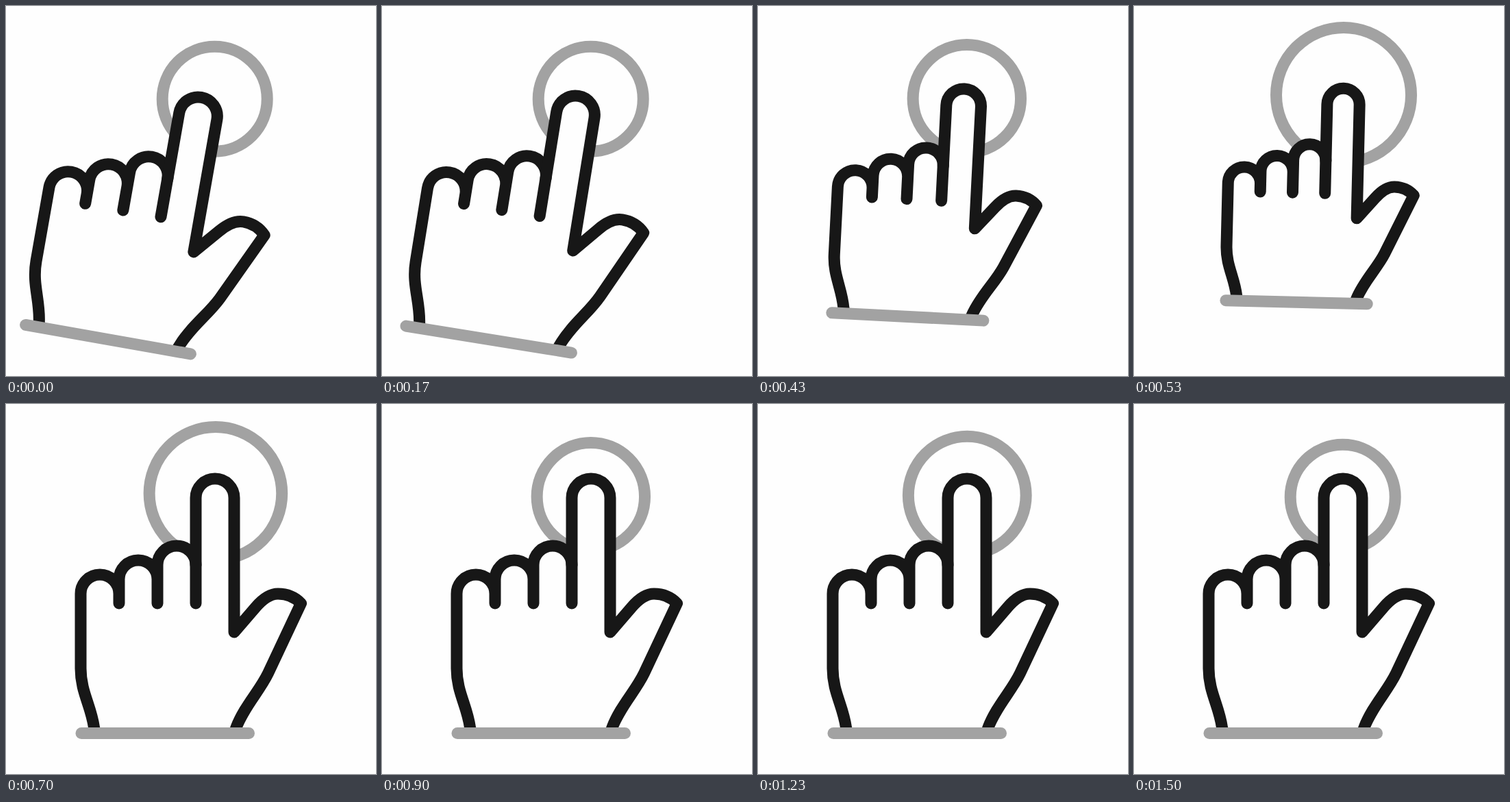
Recreate the animation shown at these times as an HTML page. Size 540x540 px, loop 1.53 s.

```html
<!DOCTYPE html>
<html lang="en">
<head>
<meta charset="utf-8">
<title>Tapping hand</title>
<style>
  html, body { margin: 0; width: 100%; height: 100%; overflow: hidden; background: #fefefe; }
  svg { display: block; width: 100%; height: 100%; }
  path, circle {
    fill: none; stroke-width: 17; stroke-linecap: round; stroke-linejoin: round;
    vector-effect: non-scaling-stroke;
  }
  .ink { stroke: #171717; }
  .soft { stroke: #a2a2a2; }
  .palm { fill: #fefefe; }
</style>
</head>
<body>
<svg viewBox="0 0 540 540">
  <circle id="ring" class="soft"/>
  <g id="hand">
    <path class="palm" d="M130 479 L128.5 472 C124 440 109 420 109 386 V277 A28 28 0 0 1 165 277 V256 A28 28 0 0 1 221 256 V235 A28 28 0 0 1 277 235 V137 A28 28 0 0 1 333 137 V333 L364 297 C375 284 385 277 397 277 C410 277 421 281 430.5 291 L382.5 393 C370 419 348 441 336 472 L333.5 479 Z"/>
    <path class="ink" d="M130 479 L128.5 472 C124 440 109 420 109 386 V277 A28 28 0 0 1 165 277 V291 V256 A28 28 0 0 1 221 256 V291 V235 A28 28 0 0 1 277 235"/>
    <path class="ink" d="M277 291 V137 A28 28 0 0 1 333 137 V333 L364 297 C375 284 385 277 397 277 C410 277 421 281 430.5 291 L382.5 393 C370 419 348 441 336 472 L333.5 479"/>
    <path class="soft" d="M110 480.5 H354.5"/>
  </g>
</svg>
<script>
const LOOP = 1530, STEP = 100 / 3, LAST = 45;
const ring = document.getElementById('ring');
const hand = document.getElementById('hand');

const span = (t, a, b) => Math.min(1, Math.max(0, (t - a) / (b - a)));
const smooth = x => x * x * (3 - 2 * x);
const steep = (x, k) => x ** k / (x ** k + (1 - x) ** k);
// rises from a to b, then falls back until c
const pulse = (t, a, b, c) => smooth(span(t, a, b)) * (1 - smooth(span(t, b, c)));

function draw(n) {
  const away = 1 - steep(span(n, 0, 20.8), 2.1);
  const press = 0.156 * (pulse(n, 9, 16, 18.8) + pulse(n, 27, 30, 32.8));
  const x = 305 - 24.7 * away + 15 * press;
  const y = 137 + 24 * away + 33 * press;
  const angle = 10 * away + 4.2 * press;
  hand.setAttribute('transform',
    `translate(${x} ${y}) rotate(${angle}) scale(${1 - press}) translate(-305 -137)`);

  const grow = 29.7 * (pulse(n, 12, 18, 26) + pulse(n, 26, 32, 40));
  ring.setAttribute('cx', 304.7 + 0.06 * grow);
  ring.setAttribute('cy', 135.7 - 0.26 * grow);
  ring.setAttribute('r', 76.5 + grow);
}

function tick() {
  const t = performance.now() % LOOP;
  draw(Math.min(LAST, Math.floor((t + 3.5) / STEP)));
  requestAnimationFrame(tick);
}
tick();
</script>
</body>
</html>
```
